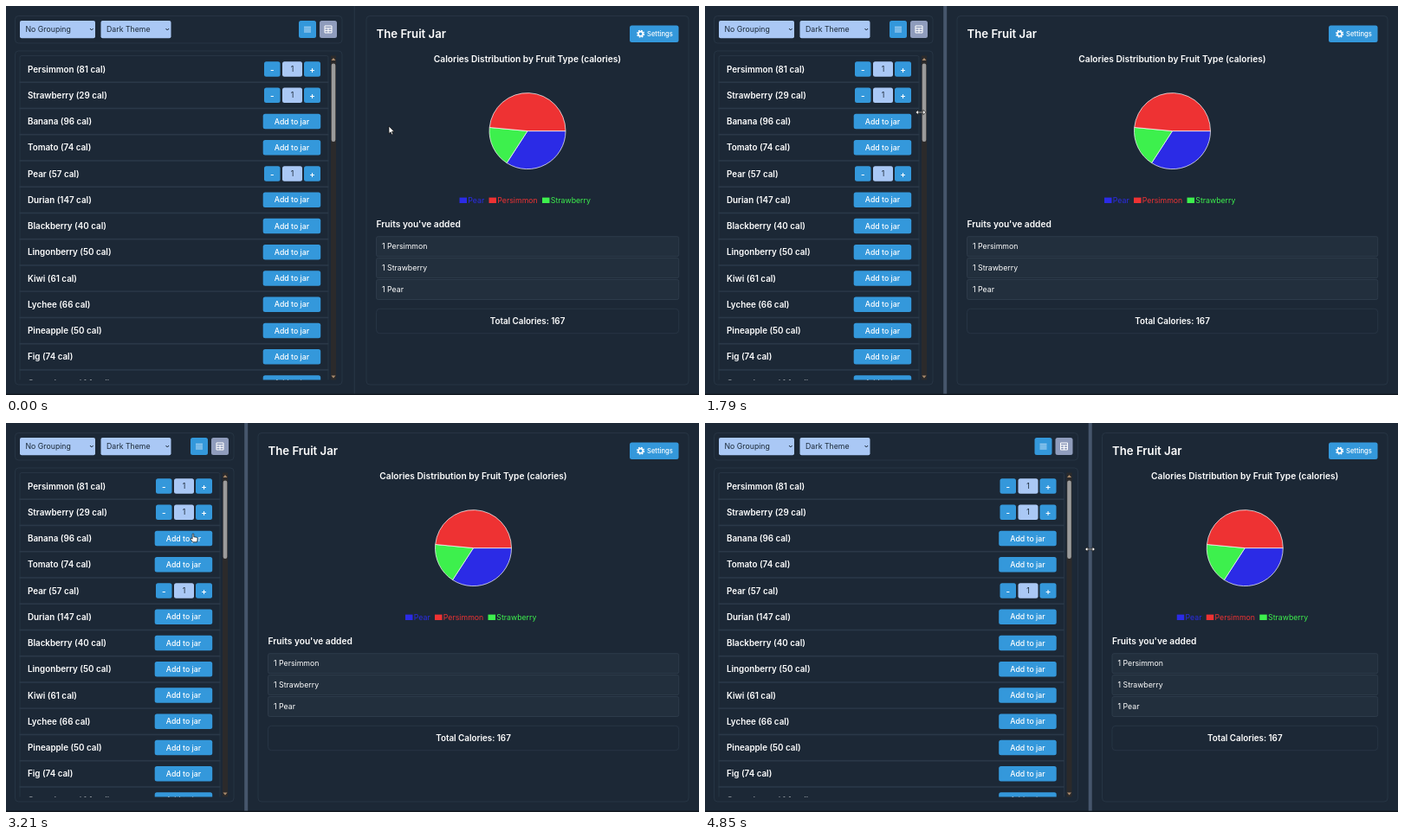
Write an HTML page that moves like this. It is 800 by 450 pixels and loops after 4.88 s.

```html
<!DOCTYPE html>
<html lang="en">
<head>
<meta charset="utf-8">
<title>The Fruit Jar</title>
<style>
  html, body { margin: 0; width: 100%; height: 100%; overflow: hidden; background: #1c2836; }
  svg { display: block; width: 800px; height: 450px; }
  text { font-family: Inter, sans-serif; font-size: 8.75px; fill: #fff; white-space: pre; }
  .bold { font-weight: 600; font-size: 9.8px; }
  .head { font-weight: 600; font-size: 10.2px; }
  .title { font-weight: 600; font-size: 13.2px; }
  .btn { font-weight: 500; }
  .small { font-weight: 500; font-size: 7.6px; }
  .dark { fill: #1b2938; }
  .mid { text-anchor: middle; }
  .frame { fill: none; stroke: #2a3848; stroke-width: .8; }
  .entry { fill: #222f3d; stroke: #323f4e; stroke-width: .8; }
  .blue { fill: #3498db; }
  .pale { fill: #aac8f5; }
</style>
</head>
<body>
<script>
const NS = 'http://www.w3.org/2000/svg';
const LOOP = 4880, START = 402, MIN = 277, MAX = 527;
const HOVER_AT = 330, DRAG_AT = 900, CHART_LAG = 85;

// Pointer path: time, x, y
const PATH = [
  [0, 442, 139], [400, 402, 125], [900, 402, 125], [1180, 255, 124],
  [1450, 545, 123], [1750, 250, 123], [1790, 249, 123], [2200, 547, 121],
  [2250, 548, 121], [2560, 235, 128], [2870, 545, 131], [3200, 218, 133],
  [3215, 217, 133], [3460, 500, 140], [3710, 196, 146], [4020, 530, 148],
  [4380, 330, 147], [4700, 444.5, 146], [LOOP, 444.5, 146]
];

const FRUITS = [
  ['Persimmon', 81, 1], ['Strawberry', 29, 1], ['Banana', 96], ['Tomato', 74],
  ['Pear', 57, 1], ['Durian', 147], ['Blackberry', 40], ['Lingonberry', 50],
  ['Kiwi', 61], ['Lychee', 66], ['Pineapple', 50], ['Fig', 74], ['Gooseberry', 44]
];

function el(parent, tag, attrs = {}) {
  const node = document.createElementNS(NS, tag);
  for (const k in attrs) node.setAttribute(k, attrs[k]);
  parent.append(node);
  return node;
}
const group = (parent, attrs) => el(parent, 'g', attrs);
const path = (parent, d, attrs) => el(parent, 'path', { d, ...attrs });
const rect = (parent, x, y, width, height, cls, rx = 2.5) =>
  el(parent, 'rect', { x, y, width, height, rx, class: cls });
function text(parent, str, x, y, cls = '') {
  el(parent, 'text', { x, y, dy: '.36em', class: cls }).textContent = str;
}
const move = (node, x, y = 0) => node.setAttribute('transform', `translate(${x} ${y})`);

const svg = el(document.body, 'svg', { viewBox: '0 0 800 450' });
const clip = el(el(svg, 'clipPath', { id: 'list' }), 'rect', { x: 0, y: 57, width: 800, height: 375.5 });

// Boxes whose inner edge follows the divider
const stretchy = [];
function leftBox(x, y, h, gap, rx = 4, parent = svg, cls = 'frame') {
  const node = rect(parent, x, y, 0, h, cls, rx);
  stretchy.push(s => node.setAttribute('width', s - gap - x));
}
function rightBox(gap, y, h, end, cls = 'frame', rx = 4) {
  const node = rect(svg, 0, y, 0, h, cls, rx);
  stretchy.push(s => {
    node.setAttribute('x', s + gap);
    node.setAttribute('width', end - s - gap);
  });
}

// Left side
leftBox(10.5, 11.5, 31.5, 14);
leftBox(10.5, 52, 386, 14);
[['No Grouping', 16, 87], ['Dark Theme', 109.5, 81]].forEach(([label, x, w]) => {
  rect(svg, x, 17, w, 20.3, 'pale', 2);
  text(svg, label, x + 6.5, 27.2, 'dark');
  path(svg, `M${x + w - 6} 26l1.8 2 1.8-2`, { fill: 'none', stroke: '#1b2938' });
});

const rows = group(svg, { 'clip-path': 'url(#list)' });
leftBox(16, 57.5, 400, 30, 2, rows);
const tools = group(svg);
const rowTools = group(rows);

function button(x, y, w, label, cls = 'blue', textCls = 'btn mid') {
  rect(rowTools, x, y - 8.8, w, 17.6, cls);
  text(rowTools, label, x + w / 2, y, textCls);
}
FRUITS.forEach(([name, cal, count], i) => {
  const y = 73 + 30.25 * i;
  text(rows, `${name} (${cal} cal)`, 25, y, 'bold');
  leftBox(16, y + 14.8, .8, 30, 0, rows, 'frame');
  if (count) {
    button(-104, y, 18.5, '-', 'blue', 'bold mid');
    button(-83, y, 23, count, 'pale', 'mid dark');
    button(-58, y, 19, '+', 'blue', 'bold mid');
  } else {
    button(-105.3, y, 66.5, 'Add to jar');
  }
});

// View toggles and scrollbar
rect(tools, -64, 17, 20, 20, 'blue');
path(tools, 'M-58 24.3h8M-58 26.2h8M-58 28.1h8M-58 30h8', { stroke: '#b4d9f5', 'stroke-width': 1 });
rect(tools, -40, 17, 20, 20, '', 2.5).setAttribute('fill', '#8f9cbc');
path(tools, 'M-34 23h8v8h-8zM-34 25.8h8M-34 28.4h8M-30 25.8v5.2', { fill: 'none', stroke: '#fff', 'stroke-width': 1 });
rect(tools, -27, 57.5, 6, 375, '', 0).setAttribute('fill', '#2b2a2b');
rect(tools, -26.3, 66.5, 4.6, 90.5, '', 2.3).setAttribute('fill', '#9b9b9b');
path(tools, 'M-26.5 63l2.5-3 2.5 3zM-26.5 427.5l2.5 3 2.5-3z', { fill: '#a98a6c' });

// Right side
rightBox(14, 11.5, 426.5, 788);
[266.7, 291.6, 316.5].forEach(y => rightBox(25.5, y, 23, 776.7, 'entry', 2));
rightBox(25.5, 350.3, 28.4, 776.7);

const labels = group(svg);
text(labels, 'The Fruit Jar', 25.5, 32, 'title');
text(labels, "Fruits you've added", 25.5, 252.5, 'head');
['Persimmon', 'Strawberry', 'Pear'].forEach((name, i) => text(labels, '1 ' + name, 32, 278.2 + 24.9 * i));

rect(svg, 720, 22.5, 56.5, 19.5, 'blue');
el(svg, 'circle', { cx: 732.6, cy: 32.2, r: 2.6, fill: 'none', stroke: '#fff', 'stroke-width': 1.6 });
el(svg, 'circle', {
  cx: 732.6, cy: 32.2, r: 3.9, fill: 'none', stroke: '#fff', 'stroke-width': 1.4, 'stroke-dasharray': '1.7 1.363'
});
text(svg, 'Settings', 740, 32.2, 'small');

const centred = group(svg);
text(centred, 'Calories Distribution by Fruit Type (calories)', 0, 61, 'head mid');
text(centred, 'Total Calories: 167', 0, 364.6, 'bold mid');

// Pie with legend
const chart = group(svg);
let angle = 0;
[
  ['Pear', 57, '#2b2be6', -78.5], ['Strawberry', 29, '#3df04d', 17], ['Persimmon', 81, '#ee3233', -44.5]
].forEach(([name, value, fill, x]) => {
  const R = 44, point = a => `${R * Math.cos(a)} ${144.6 + R * Math.sin(a)}`;
  const end = angle + value / 167 * 2 * Math.PI;
  path(chart, `M0 144.6L${point(angle)}A${R} ${R} 0 0 1 ${point(end)}Z`, { fill, stroke: '#fff', 'stroke-width': .7 });
  angle = end;
  rect(chart, x, 221.6, 8.5, 6.4, '', 0).setAttribute('fill', fill);
  text(chart, name, x + 9.8, 224.7);
  chart.lastChild.style.fill = fill;
});

// Divider, bottom edge, pointers
const divider = rect(svg, 0, 0, 1, 450, '', 0);
rect(svg, 0, 448.6, 800, 1.4, '', 0).setAttribute('fill', '#10171f');

const pointer = group(svg);
const edge = { fill: '#fff', stroke: '#111', 'stroke-width': .7, 'stroke-linejoin': 'round' };
const cursors = {
  arrow: path(pointer, 'M0 0V8.6L2 6.8L3.4 9.8L4.8 9.2L3.5 6.3H6.1Z', edge),
  resize: path(pointer, 'M-5.8 0L-2.8-2.8V-.7H2.8V-2.8L5.8 0L2.8 2.8V.7H-2.8V2.8Z', edge),
  hand: path(pointer, 'M-2-4.6Q-1.2-5.6-.4-4.6V-1.3L3-.7Q4.2-.3 4 1L3.3 4.8H-1.4L-4.2 1.3Q-4.2 0-3 .3L-2 1.2Z', edge)
};

function pointerAt(t) {
  const i = Math.max(1, PATH.findIndex(p => p[0] > t));
  const [t0, x0, y0] = PATH[i - 1], [t1, x1, y1] = PATH[i];
  const k = (1 - Math.cos(Math.PI * (t - t0) / (t1 - t0))) / 2;
  return [x0 + (x1 - x0) * k, y0 + (y1 - y0) * k];
}
const splitAt = t => t < DRAG_AT ? START : Math.min(MAX, Math.max(MIN, pointerAt(t)[0]));

function draw(t) {
  const s = splitAt(t), [x, y] = pointerAt(t), hover = t > HOVER_AT;
  stretchy.forEach(fit => fit(s));
  move(tools, s);
  move(rowTools, s);
  move(labels, s);
  move(centred, (s + 802) / 2);
  // The chart keeps its previous width for a moment
  move(chart, s + 25.5 + (751 - splitAt(t - CHART_LAG)) / 2);

  const w = hover ? 4 : 1;
  divider.setAttribute('x', s - w / 2 + .2);
  divider.setAttribute('width', w);
  divider.setAttribute('fill', hover ? '#46566c' : '#2a3848');

  const kind = !hover ? 'arrow' : x < 240 ? 'hand' : 'resize';
  for (const name in cursors) cursors[name].style.display = name === kind ? '' : 'none';
  move(pointer, x, y);
}

const begin = performance.now();
function tick() {
  draw((performance.now() - begin) % LOOP);
  requestAnimationFrame(tick);
}
tick();
</script>
</body>
</html>
```
